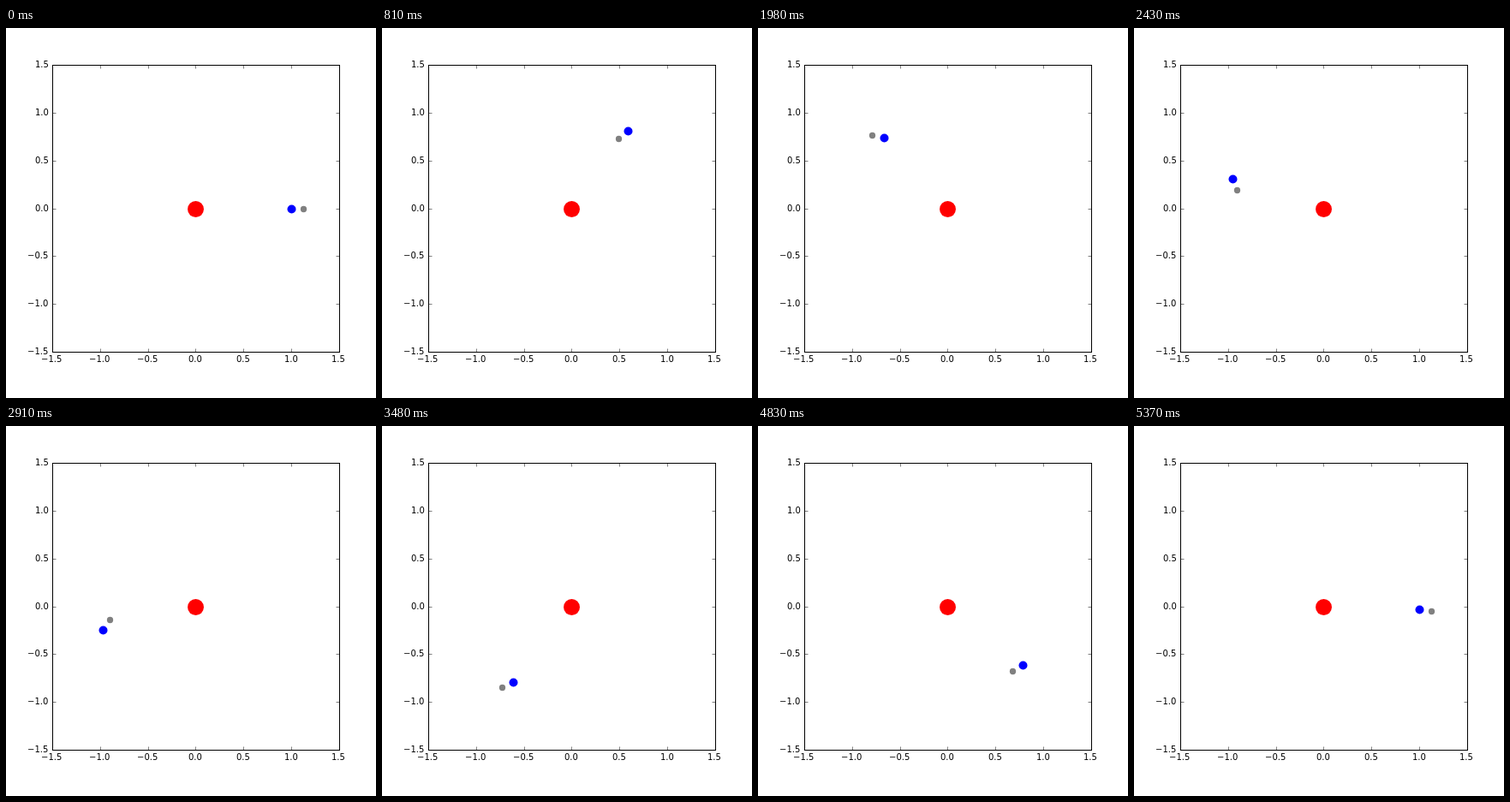
An HTML page that plays this animation: 432x432 px, repeating every 5.4 s.

```html
<!DOCTYPE html>
<html lang="en">
<head>
<meta charset="utf-8">
<title>Orbit plot</title>
<style>
html, body { margin: 0; width: 100%; height: 100%; overflow: hidden; background: #fff; }
svg { display: block; width: 432px; height: 432px; }
text { font: 10px "DejaVu Sans", sans-serif; fill: #000; }
</style>
</head>
<body>
<svg id="plot" viewBox="0 0 432 432"></svg>
<script>
const UNIT = 111.6, CX = 221.4, CY = 210.6;
const STEP = 30, STEPS = 180, MOON_DIST = 0.125;
const LEFT = 54.5, RIGHT = 389.5, TOP = 43.5, BOTTOM = 378.5, TICK = 4;

const plot = document.getElementById("plot");

function add(tag, attrs, text) {
  const el = document.createElementNS("http://www.w3.org/2000/svg", tag);
  for (const key in attrs) el.setAttribute(key, attrs[key]);
  if (text) el.textContent = text;
  plot.append(el);
  return el;
}

// Plot coordinates land on pixel centres.
const px = x => Math.round(CX + x * UNIT) + 0.5;
const py = y => Math.round(CY - y * UNIT) + 0.5;

function place(dot, x, y) {
  dot.setAttribute("cx", px(x));
  dot.setAttribute("cy", py(y));
}

// Labels start on whole pixels; align is the share of the width left of x.
function addLabel(text, x, y, align) {
  const el = add("text", { y }, text);
  el.setAttribute("x", Math.floor(x - align * el.getComputedTextLength()));
}

const disc = (r, fill) => add("circle", { r, fill });
const sun = disc(9.45, "#f00");
const earth = disc(5, "#00f");
const moon = disc(3.65, "#808080");
place(sun, 0, 0);

let ticks = "";
for (let v = -1.5; v <= 1.5; v += 0.5) {
  const x = px(v), y = py(v);
  const label = (v < 0 ? "\u2212" : "") + Math.abs(v).toFixed(1);
  if (Math.abs(v) < 1.5) {
    ticks += `M${x} ${TOP}v${TICK}M${x} ${BOTTOM}v${-TICK}`;
    ticks += `M${LEFT} ${y}h${TICK}M${RIGHT} ${y}h${-TICK}`;
  }
  addLabel(label, CX + v * UNIT, 390, 0.5);
  addLabel(label, 50, y + 2.5, 1);
}
add("path", { d: ticks, stroke: "#000", "stroke-width": 1, "stroke-opacity": 0.5 });
add("rect", {
  x: LEFT, y: TOP, width: RIGHT - LEFT, height: BOTTOM - TOP,
  fill: "none", stroke: "#000"
});

function draw(time) {
  const step = Math.floor(time / STEP) % STEPS;
  const year = step / STEPS * 2 * Math.PI;
  const month = 4 * year;
  const x = Math.cos(year), y = Math.sin(year);
  place(earth, x, y);
  place(moon, x + MOON_DIST * Math.cos(month), y + MOON_DIST * Math.sin(month));
}

const start = performance.now();
function tick() {
  draw(performance.now() - start);
  requestAnimationFrame(tick);
}
tick();
</script>
</body>
</html>
```
